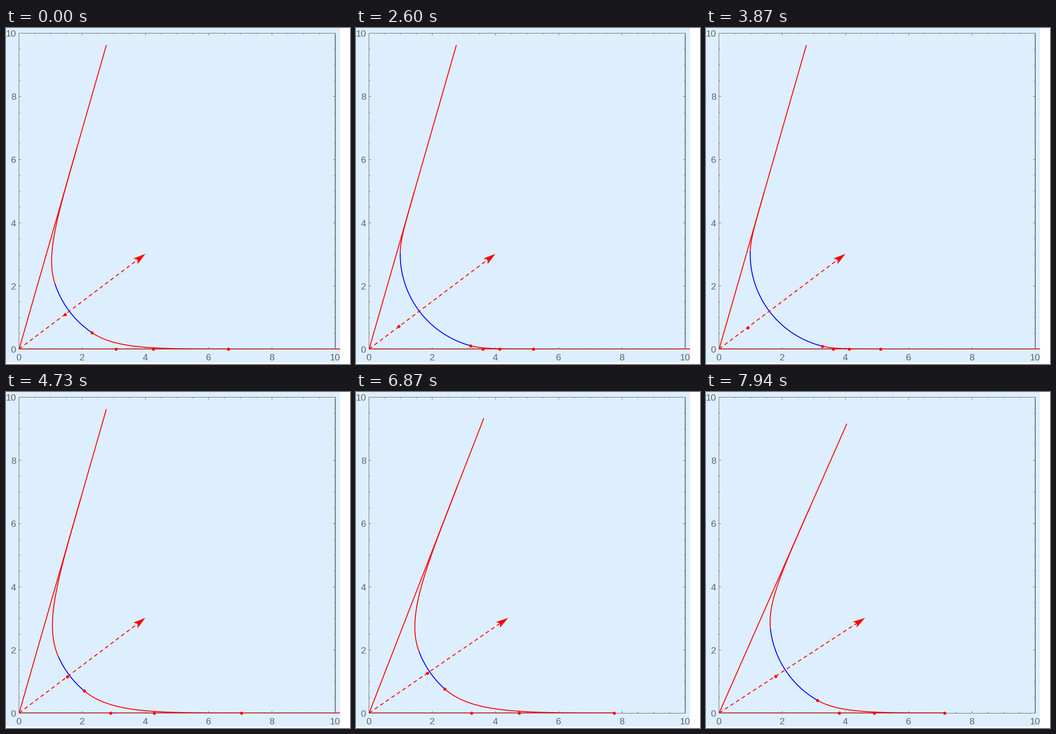
Write a matplotlib script that moves like this. It is 757x740 px and loops after 8000 ms.

```python
import numpy as np
import matplotlib.pyplot as plt
from matplotlib.animation import FuncAnimation
from matplotlib.patches import Polygon, Rectangle

W, H, DPI = 757, 740, 64
PX = 72 / DPI                  # one pixel in points
UNIT = 69.6
LEFT, BASE = 28.5, 707.5       # corner of the plot frame
X0, Y0 = 29, 706.8             # origin of the drawn curves
R, ARM = 3, 10                 # arc radius, length of the slanted line
GRAY = "#666666"
STEP, LEAD, FRAMES = 40, 30, 200

# Ticks of 1/15 s: sweep of each transition, and angle of the corner
SWEEP = [(0, 34.2), (22, 34.2), (23, 33.6), (35, 5.8), (36, 5.5), (39, 15),
         (48, 38), (49, 39.1), (58, 14), (59, 14), (61, 17.2), (71, 40),
         (96, 40.1), (103, 41.8), (109, 13), (111, 12), (113, 12), (119, 30.1)]
CORNER = [(0, 74), (94, 74), (95, 73.6), (96, 73.6), (103, 68.76),
          (109, 62.4), (111, 61.9), (113, 61.9), (119, 66.2)]

plt.rcParams["path.snap"] = False


def track(keys, tick):
    return np.interp(tick, *zip(*keys))


def to_px(points):
    x, y = np.asarray(points, float).T
    return np.column_stack([X0 + UNIT * x, Y0 - UNIT * y])


def bezier(p):
    t = np.linspace(0, 1, 80)[:, None]
    s = 1 - t
    return s**3 * p[0] + 3 * s * s * t * p[1] + 3 * s * t * t * p[2] + t**3 * p[3]


def geometry(sweep, corner):
    a, th = np.radians([sweep, corner])
    half = th / 2
    axis = np.array([np.cos(half), np.sin(half)])
    centre = np.array([R / np.tan(half), R])
    near = R * np.tan(a / 2)
    h = near * (1.284 + 0.0034 * (34.2 - sweep) + 0.0098 * (74 - corner))
    foot = centre[0] - near
    join = centre + R * np.array([-np.sin(a), -np.cos(a)])
    ctrl = np.array([[foot + 3 * h, 0], [foot + h, 0], [foot, 0], join])
    beta = np.pi / 2 - half - a
    peak = centre - axis * R / np.cos(beta)
    mirror = np.array([[np.cos(th), np.sin(th)], [np.sin(th), -np.cos(th)]])
    lower = bezier(ctrl)
    phi = np.pi + half + np.linspace(beta, -beta, 80)
    arc = centre + R * np.column_stack([np.cos(phi), np.sin(phi)])
    arm = [[0, 0], [ARM * np.cos(th), ARM * np.sin(th)]]
    return dict(lower=lower, upper=lower @ mirror, arc=arc, arm=arm,
                dots=np.vstack([ctrl, peak]), centre=centre, axis=axis)


fig = plt.figure(figsize=(W / DPI, H / DPI), dpi=DPI, facecolor="white")
ax = fig.add_axes([0, 0, 1, 1])
ax.set_xlim(0, W)
ax.set_ylim(H, 0)
ax.axis("off")
panel = Rectangle((0, 0), 735, 737, fc="#DDEEFF", lw=0, zorder=0)
ax.add_patch(panel)


def stroke(color, width=2, **kw):
    kw = {"solid_capstyle": "butt", "zorder": 3, **kw}
    line, = ax.plot([], [], color=color, lw=width * PX, **kw)
    line.set_clip_path(panel)
    return line


def draw_frame():
    right, top, nan = LEFT + 10 * UNIT, BASE - 10 * UNIT, np.nan
    stroke(GRAY, 1, zorder=4).set_data([right, LEFT, LEFT, right],
                                       [top, top, BASE, BASE])
    stroke("#4a4a4a", 1.6, zorder=4).set_data([right, right], [top, BASE])
    xs, ys = [], []
    for i in range(21):
        size = 5 if i % 4 == 0 else 2.5
        x, y = LEFT + i * UNIT / 2, BASE - i * UNIT / 2
        xs += [x, x, nan, x, x, nan, LEFT, LEFT + size, nan, right, right - size, nan]
        ys += [BASE, BASE - size, nan, top, top + size, nan, y, y, nan, y, y, nan]
    stroke(GRAY, 1, zorder=4).set_data(xs, ys)
    font = dict(family="Liberation Sans", size=20.5 * PX, color=GRAY)
    for v in range(0, 11, 2):
        ax.text(LEFT - 0.5 + v * UNIT, 732, str(v), ha="center", va="baseline", **font)
        ax.text(22, BASE - v * UNIT + 7.5, str(v), ha="right", va="baseline", **font)


draw_frame()
ground = stroke("red")
arm = stroke("red")
lower = stroke("red")
upper = stroke("red")
arc = stroke("blue")
ray = stroke("red", linestyle=(0, (4.2, 3.2)), dash_capstyle="butt")
dots = stroke("red", linestyle="none", marker="o", markersize=6.8 * PX,
              markeredgewidth=0, zorder=5)
head = Polygon(np.zeros((4, 2)), fc="red", lw=0, zorder=5)
ax.add_patch(head)


def update(i):
    tick = (i * STEP + LEAD + 4) * 15 // 1000
    g = geometry(track(SWEEP, tick), track(CORNER, tick))
    for name, line in (("arm", arm), ("lower", lower), ("upper", upper),
                       ("arc", arc), ("dots", dots)):
        line.set_data(*to_px(g[name]).T)
    start = to_px(g["dots"])[0, 0]
    ground.set_data([X0, W if tick < 97 else start], [Y0, Y0])

    along = g["axis"] * [1, -1]
    side = along[::-1] * [-1, 1]
    tip = to_px([g["centre"]])[0] + 0.8 * along
    notch = tip - 21.5 * along
    head.set_xy([tip, tip - 27 * along + 7.6 * side, notch,
                 tip - 27 * along - 7.6 * side])
    ray.set_data([X0, notch[0]], [Y0, notch[1]])
    return ground, arm, lower, upper, arc, ray, dots, head


anim = FuncAnimation(fig, update, frames=FRAMES, interval=STEP,
                     repeat=True, repeat_delay=0, blit=False)
plt.show()
```
